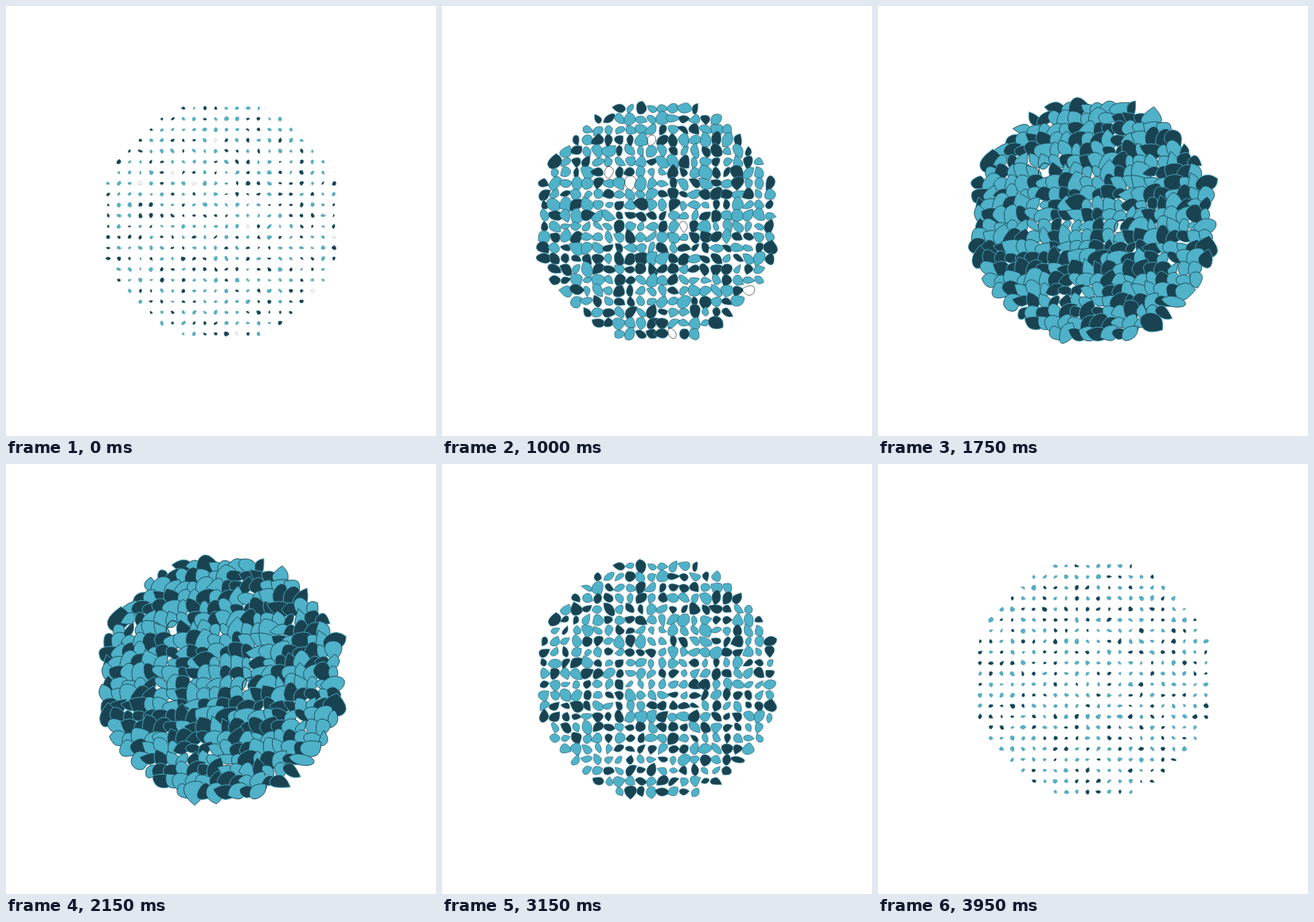
Recreate the animation shown at these times as an HTML page with a canvas. Size 540 px wide and 540 px high, loop 4 s.

```html
<!DOCTYPE html>
<html>
<head>
<meta charset="utf-8">
<style>
html, body { margin: 0; width: 100%; height: 100%; overflow: hidden; background: #fff; }
canvas { display: block; }
</style>
</head>
<body>
<canvas id="stage" width="540" height="540"></canvas>
<script>
const ctx = document.getElementById('stage').getContext('2d');
const LIGHT = '#4fb2c9', DARK = '#1a4352';
const SIZE = 540, GRID = 13.5, RADIUS = 150;
const STEP = 50, STEPS = 80;

let seed = 20177;
function rnd(a = 0, b = 1) {
  seed = (seed + 0x6D2B79F5) | 0;
  let n = Math.imul(seed ^ (seed >>> 15), 1 | seed);
  n = (n + Math.imul(n ^ (n >>> 7), 61 | n)) ^ n;
  return a + (b - a) * (((n ^ (n >>> 14)) >>> 0) / 4294967296);
}

const chance = p => rnd() < p;
const randomFill = () => chance(0.55) ? LIGHT : DARK;
const mid = (p, q) => [(p[0] + q[0]) / 2, (p[1] + q[1]) / 2];

// Smooth closed leaf, squashed across its axis, with one sharp tip
function leaf(size) {
  const n = chance(0.3) ? 4 : 5;
  const axis = rnd(0, 2 * Math.PI), squash = rnd(0.68, 1);
  const cos = Math.cos(axis), sin = Math.sin(axis);
  const pts = Array.from({ length: n }, (_, k) => {
    const a = k ? (k + rnd(-0.3, 0.3)) / n * 2 * Math.PI : 0;
    const r = size * (k ? rnd(0.85, 1.25) : rnd(0.85, 1.1));
    const u = r * Math.cos(a), v = r * Math.sin(a) * squash;
    return [u * cos - v * sin, u * sin + v * cos];
  });
  const path = new Path2D();
  path.moveTo(...pts[0]);
  for (let k = 1; k < n; k++) {
    const end = k < n - 1 ? mid(pts[k], pts[k + 1]) : pts[0];
    path.quadraticCurveTo(...pts[k], ...end);
  }
  path.closePath();
  return path;
}

// Colour and outline are each drawn anew now and then; a few cells start unfilled
function makeCell(x, y) {
  const size = rnd(11.5, 18.5);
  let fill = chance(0.02) ? null : randomFill();
  let path = leaf(size);
  const states = [];
  for (let s = 0; s < STEPS; s++) {
    if (chance(0.03)) fill = randomFill();
    if (chance(0.025)) path = leaf(size);
    states.push({ path, fill });
  }
  return { x, y, states };
}

const cells = [];
for (let y = GRID / 2; y < SIZE; y += GRID) {
  for (let x = GRID / 2; x < SIZE; x += GRID) {
    if (Math.hypot(x - SIZE / 2, y - SIZE / 2) < RADIUS) cells.push(makeCell(x, y));
  }
}

function draw(time) {
  const step = Math.floor(time / STEP) % STEPS;
  const grow = 1 - Math.abs(1 - 2 * step / STEPS);
  const scale = 0.19 + 0.81 * grow;
  ctx.setTransform(1, 0, 0, 1, 0, 0);
  ctx.clearRect(0, 0, SIZE, SIZE);
  ctx.lineWidth = 0.9;
  for (const { x, y, states } of cells) {
    const { path, fill } = states[step];
    ctx.setTransform(scale, 0, 0, scale, x, y);
    if (fill) {
      ctx.fillStyle = fill;
      ctx.fill(path);
    }
    ctx.strokeStyle = !fill ? '#000' : fill === LIGHT ? DARK : LIGHT;
    ctx.stroke(path);
  }
}

const start = performance.now();
function tick() {
  draw(performance.now() - start);
  requestAnimationFrame(tick);
}
tick();
</script>
</body>
</html>
```
